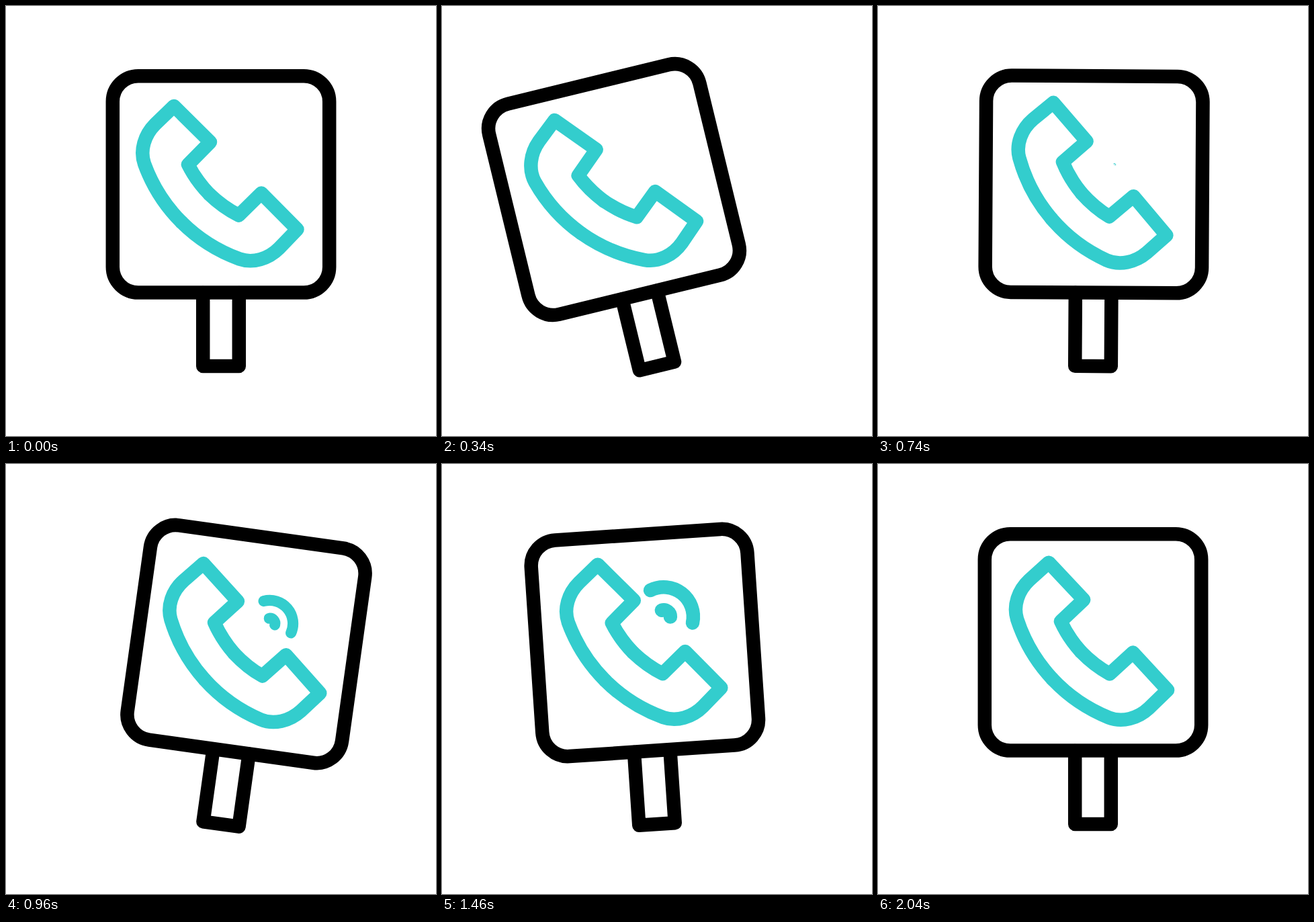
Animation of 640 by 640 pixels, one loop 2.62 s. Source, as an HTML page:

```html
<!DOCTYPE html>
<html lang="en">
<head>
<meta charset="utf-8">
<title>Phone sign</title>
<style>
  html, body { margin: 0; width: 100%; height: 100%; overflow: hidden; background: #fff; }
  svg { display: block; width: 100%; height: 100%; }
  g { fill: none; stroke-width: 20.5; stroke-linecap: round; stroke-linejoin: round; }
</style>
</head>
<body>
<svg viewBox="0 0 640 640">
  <g id="sign" stroke="#000">
    <rect x="158.8" y="104.2" width="322.4" height="322.4" rx="38"/>
    <path d="M293.2 427V536H346.8V427"/>
    <g stroke="#33cdcd">
      <!-- One half of the handset, mirrored along its diagonal -->
      <g id="phone">
        <path id="half" d="M261 321.5C237 297.5 218 268 206 235C199 215 206 192 222 176L250 149L304 202.5L271 236C279 252 290 267 302.5 280"/>
        <use href="#half" transform="matrix(0 -1 -1 0 582.5 582.5)"/>
      </g>
      <g id="waves">
        <path d="M333.4 188.1A44 44 0 0 1 392.9 240.7"/>
        <path d="M348.2 218.9A10 10 0 0 1 360.5 229.6"/>
      </g>
    </g>
  </g>
</svg>
<script>
const LOOP = 2620, STEP = 20;
const [sign, phone, waves] = ["sign", "phone", "waves"].map(id => document.getElementById(id));

// Turning points of each swing: [time in ms, degrees]
const signSwing = [[0, 0], [376, -14.05], [465, -14.05], [925, 8.25], [1340, -5.87], [1717, 2.6], [1870, -0.9], [2040, 0]];
const phoneSwing = [[0, 0], [620, 7.15], [1000, -5.3], [1440, 3.87], [1790, -1.85], [2040, 2]];

// Eased progress from 0 to 1 between two times
function ease(t, from, to) {
  const x = Math.min(1, Math.max(0, (t - from) / (to - from)));
  return x * x * (3 - 2 * x);
}

function angleAt(swing, t) {
  return swing.slice(1).reduce((angle, [time, end], i) => {
    const [prevTime, prevEnd] = swing[i];
    return angle + (end - prevEnd) * ease(t, prevTime, time);
  }, swing[0][1]);
}

function draw(now) {
  const t = Math.floor(now % LOOP / STEP) * STEP;
  const size = ease(t, 690, 1075) - ease(t, 1460, 1760);
  sign.setAttribute("transform", `rotate(${angleAt(signSwing, t)} 320 536)`);
  phone.setAttribute("transform", `rotate(${angleAt(phoneSwing, t)} 320 265)`);
  waves.setAttribute("transform", `translate(350 236.5) scale(${size}) translate(-350 -236.5)`);
  waves.setAttribute("visibility", size > 0 ? "visible" : "hidden");
}

const start = performance.now();
function tick() {
  draw(performance.now() - start);
  requestAnimationFrame(tick);
}
tick();
</script>
</body>
</html>
```
